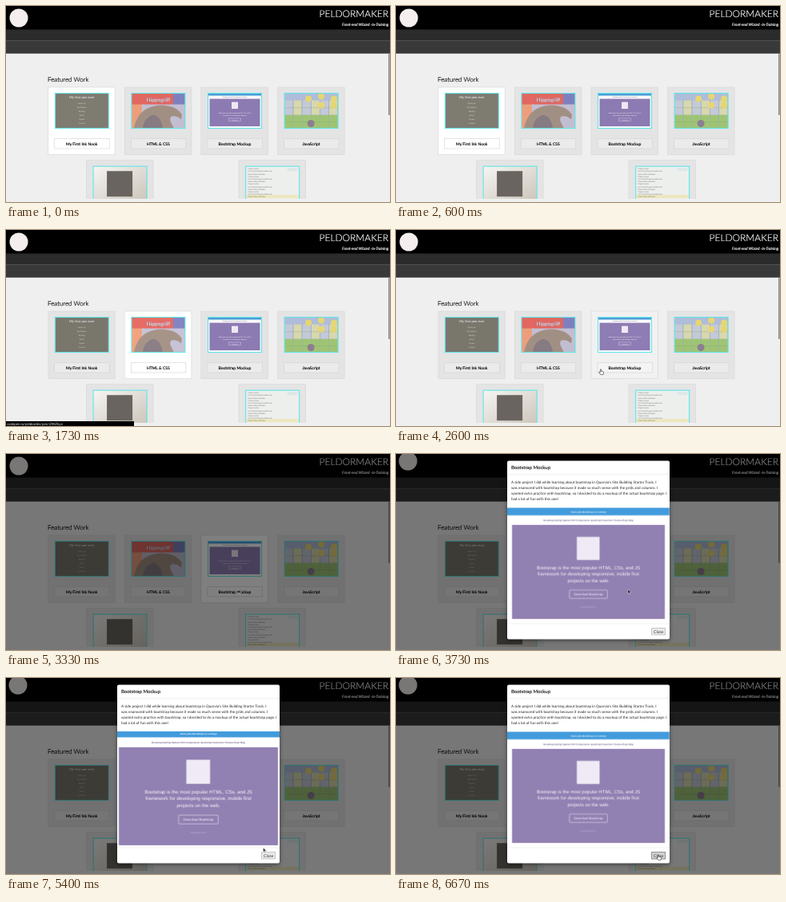
An HTML page that plays this animation: 480 by 246 pixels, repeating every 6740 ms.

```html
<!DOCTYPE html>
<html lang="en">
<head>
<meta charset="utf-8">
<title>Portfolio</title>
<style>
  html, body { margin: 0; width: 100%; height: 100%; overflow: hidden; background: #efefef; }
  svg { display: block; width: 100vw; height: 100vh; font-family: Lato, sans-serif; text-rendering: geometricPrecision; }
  .mid { text-anchor: middle; }
  .end { text-anchor: end; }
  .light { font-weight: 300; }
  .bold { font-weight: 700; }
  .helv { font-family: "Liberation Sans", Arial, sans-serif; }

  .hover, .anim { animation: 6740ms linear infinite; }
  .hover { opacity: 0; fill: #fff; }
  .hover1 { animation-name: hover1; }
  .hover2 { animation-name: hover2; }
  .hover3 { animation-name: hover3; }
  @keyframes hover1 { 0%, 11.87% { opacity: 1 } 13.35%, 100% { opacity: 0 } }
  @keyframes hover2 { 0%, 11.87% { opacity: 0 } 13.35%, 33.8% { opacity: 1 } 36.8%, 100% { opacity: 0 } }
  @keyframes hover3 { 0%, 37.1% { opacity: 0 } 40.1%, 100% { opacity: 1 } }

  #status { animation-name: status; animation-timing-function: step-end; }
  @keyframes status { 0% { opacity: 0 } 12.91% { opacity: 1 } 26.7%, 100% { opacity: 0 } }

  #logo { animation-name: logo; animation-timing-function: step-end; }
  @keyframes logo { 0% { transform: none } 50.45%, 100% { transform: translate(-1px, -6px) } }

  #shade { animation-name: shade; }
  @keyframes shade { 0%, 47.48% { opacity: 0 } 49.26%, 100% { opacity: .5 } }

  #modal { animation-name: slide, appear; animation-timing-function: ease-out, linear; }
  @keyframes slide { 0%, 50.45% { transform: translateY(-61px) } 54.9%, 100% { transform: none } }
  @keyframes appear { 0%, 50.45% { opacity: 0 } 52.67%, 100% { opacity: 1 } }

  #shot { transform-origin: 240.5px 138px; animation-name: zoom; animation-timing-function: ease; }
  @keyframes zoom {
    0%, 59.35% { transform: none }
    63.8%, 80.2% { transform: scale(1.042) }
    84.6%, 100% { transform: none }
  }

  #press { animation-name: press; animation-timing-function: step-end; }
  @keyframes press { 0% { opacity: 0 } 82%, 100% { opacity: 1 } }

  #cursor { animation-name: move; animation-timing-function: ease-in-out; }
  @keyframes move {
    0%, 33.2% { transform: translate(222px, 178px) }
    37.1%, 39.32% { transform: translate(256px, 175px) }
    43.77%, 69.73% { transform: translate(290px, 170px) }
    80.12% { transform: translate(321.5px, 213px) }
    83.83%, 100% { transform: translate(328px, 222px) }
  }
  #hand { animation-name: hand; animation-timing-function: step-end; }
  #arrow { animation-name: arrow; animation-timing-function: step-end; }
  @keyframes hand { 0% { opacity: 0 } 33.6% { opacity: 1 } 47.48% { opacity: 0 } 82%, 100% { opacity: 1 } }
  @keyframes arrow { 0% { opacity: 0 } 47.48% { opacity: 1 } 82%, 100% { opacity: 0 } }
</style>
</head>
<body>
<svg viewBox="0 0 480 246" preserveAspectRatio="none">
  <defs>
    <clipPath id="pageClip"><rect width="480" height="242"/></clipPath>
    <clipPath id="thumbClip"><rect width="67" height="44"/></clipPath>
    <clipPath id="shotClip"><rect x="139" y="67.5" width="203" height="143.5"/></clipPath>
    <linearGradient id="paper" x2="1" y2="1">
      <stop stop-color="#fbfaf7"/><stop offset="1" stop-color="#c6bdb0"/>
    </linearGradient>
    <filter id="blur" x="-20%" y="-20%" width="140%" height="140%"><feGaussianBlur stdDeviation="2.5"/></filter>
  </defs>

  <rect width="480" height="246" fill="#efefef"/>
  <rect width="480" height="30"/>
  <rect y="29.5" width="480" height="13.5" fill="#2b2b2b"/>
  <rect y="43" width="480" height=".7" fill="#1c1c1c"/>
  <rect y="43.7" width="480" height="16" fill="#393939"/>
  <circle id="logo" class="anim" cx="16" cy="15" r="11.5" fill="#f4eeee"/>
  <text class="end light" x="478" y="14" font-size="12" fill="#fff" stroke="#fff" stroke-width=".2">PELDORMAKER</text>
  <text class="end" x="478" y="25.3" font-size="4.75" font-style="italic" fill="#fff" stroke="#fff" stroke-width=".15">Front-end Wizard -in-Training</text>
  <text class="light" x="52" y="95" font-size="8" fill="#111" stroke="#111" stroke-width=".2">Featured Work</text>

  <g id="cards" clip-path="url(#pageClip)"></g>
  <rect x="478" y="60" width="1.7" height="77" rx=".8" fill="#8a8a8a"/>

  <g id="status" class="anim">
    <rect y="240" width="160" height="6"/>
    <text x="1" y="244.7" font-size="4.4" fill="#eee">codepen.io/peldordev/pen/ZWZbyv</text>
  </g>

  <rect id="shade" class="anim" width="480" height="246"/>

  <g id="modal" class="anim">
    <rect x="139" y="10" width="203" height="224" rx="2" opacity=".5" filter="url(#blur)"/>
    <rect x="139" y="8.5" width="203" height="224" rx="2" fill="#fff"/>
    <text x="144" y="19" font-size="6" fill="#111" stroke="#111" stroke-width=".12">Bootstrap Mockup</text>
    <path d="M139 25.5h203M139 213h203" stroke="#e3e3e3" stroke-width=".5"/>
    <g id="story"></g>
    <g clip-path="url(#shotClip)">
      <g id="shot" class="anim helv">
        <rect x="139" y="67.5" width="203" height="143" fill="#fff"/>
        <rect x="139" y="67.5" width="203" height="9.5" fill="#429bdc"/>
        <text class="mid bold" x="240.5" y="73.3" font-size="2.7" fill="#fff">Heck yeah, Bootstrap 4 is coming!</text>
        <text class="mid" x="240.5" y="84" font-size="2.95" fill="#40346a">Bootstrap Getting Started CSS Components JavaScript Customize Themes Expo Blog</text>
        <rect x="145" y="89" width="191" height="118" fill="#9180b2"/>
        <rect x="226" y="104" width="28.5" height="29" fill="#efeaf5"/>
        <g class="mid" fill="#f8f5fc">
          <g font-size="5.85">
            <text x="240.5" y="144.3">Bootstrap is the most popular HTML, CSs, and JS</text>
            <text x="240.5" y="152.7">framework for developing responsive, mobile first</text>
            <text x="240.5" y="161">projects on the web.</text>
          </g>
          <rect x="216.7" y="170.7" width="47.5" height="10.6" rx="1" fill="none" stroke="#e5def0" stroke-width=".6"/>
          <text x="240.5" y="177.5" font-size="4">Download Bootstrap</text>
          <text x="240.5" y="192.7" font-size="2.6" fill="#c9bfdc">Currently v3.3.6</text>
        </g>
      </g>
    </g>
    <rect x="319.7" y="218.7" width="17" height="8.3" fill="#e9e9e9" stroke="#aaa" stroke-width=".6"/>
    <rect id="press" class="anim" x="319.7" y="218.7" width="17" height="8.3" fill="#d2d2d2" stroke="#777" stroke-width=".7"/>
    <text class="mid" x="328.2" y="224.6" font-size="5" fill="#333">Close</text>
  </g>

  <g id="cursor" class="anim" stroke-linejoin="round">
    <path id="hand" class="anim" d="M-.7 0q.7-.7 1.3 0v2.2l2.5.7q.7.3.5 1.3l-.6 2.4h-3.2l-2.1-2.7q0-.9.8-.6l.8.6z" fill="#fff" stroke="#222" stroke-width=".6"/>
    <path id="arrow" class="anim" d="M0 0v5.2l1.2-1.1.9 2 .9-.4-.9-1.9h1.6z" fill="#111" stroke="#fff" stroke-width=".4"/>
  </g>
</svg>
<script>
  const rect = (x, y, w, h, fill) => `<rect x="${x}" y="${y}" width="${w}" height="${h}" fill="${fill}"/>`;
  const disc = (x, y, r, fill) => `<circle cx="${x}" cy="${y}" r="${r}" fill="${fill}"/>`;
  const label = (x, y, size, fill, str, more = 'class="mid"') =>
    `<text x="${x}" y="${y}" font-size="${size}" fill="${fill}" ${more}>${str}</text>`;
  const repeat = (n, make) => Array.from({ length: n }, (_, i) => make(i)).join('');

  const penList = ['About me', 'My hobbies', 'Reading', 'Music', 'Games', 'Contact'];
  const pen = rect(0, 0, 67, 44, '#5e5a4e') +
    label(33.5, 6.5, 4.2, '#fff', 'My first pen ever') +
    penList.map((s, i) => label(33.5, 13 + i * 5, 2.3, '#d8d4c7', s)).join('');

  const painting = rect(0, 0, 67, 44, '#e0483f') +
    rect(0, 14, 15, 30, '#ee8d62') + rect(52, 0, 15, 16, '#6467b4') +
    rect(13, 14, 54, 30, '#b9b4cd') +
    '<path d="M3 44Q7 25 20 19Q33 13 46 16Q58 18 63 27L62 33Q57 28 50 29Q47 31 49 36L53 44z" fill="#927a6b"/>' +
    '<path d="M14 44Q15 31 27 27Q37 29 39 44z" fill="#6f606b"/>' +
    label(33.5, 10, 6.5, '#fff', 'Hippogriff', 'class="mid bold" stroke="#44508c" stroke-width=".2"');

  const mockup = rect(0, 0, 67, 44, '#fff') + rect(0, 0, 67, 3, '#2487d5') +
    label(33.5, 5.6, 1.6, '#40346a', 'Getting Started CSS Components JavaScript') +
    rect(2, 7, 63, 34.5, '#765fa6') + rect(29.5, 11, 8, 8.5, '#efeaf5') +
    label(33.5, 25, 1.9, '#fff', 'Bootstrap is the most popular HTML, CSs, and JS') +
    label(33.5, 28, 1.9, '#fff', 'framework for developing responsive') +
    '<rect x="26" y="31.5" width="15" height="3.5" fill="none" stroke="#e5def0" stroke-width=".4"/>' +
    label(33.5, 34, 1.6, '#fff', 'Download');

  const game = rect(0, 0, 67, 44, '#a2b3d8') + rect(0, 27, 67, 17, '#8fbd58') +
    repeat(6, i => rect(i * 11.2, 9, 10.4, 18, i % 2 ? '#d6d5a0' : '#bcc3d6')) +
    repeat(6, i => rect(i * 11.2 + 10.4, 8, .7, 36, '#86a5b5')) +
    rect(0, 18, 67, .6, '#93a980') + rect(0, 35.5, 67, .6, '#79a652') +
    [[30, 7], [46, 4], [62, 7], [46, 15], [62, 15]].map(([x, y]) => disc(x, y, 4, '#e8d257')).join('') +
    disc(33, 38, 4.5, '#77647f');

  const photo = rect(0, 0, 67, 44, 'url(#paper)') + rect(17, 6, 32, 32, '#4b453f');

  const notes = ['Project notes', 'List of the things to build next', 'Open tasks and ideas'];
  const page = rect(0, 0, 67, 44, '#f0f2f0') + rect(0, 36, 67, 4, '#eee9b4') +
    repeat(13, i => label(3, 4 + i * 3.2, 2.3, '#555', notes[i % 3], '')) +
    rect(52, 2, 13, 4, '#dce8ea');

  function card(x, y, art, name, i) {
    return `<g transform="translate(${x} ${y})">
      <rect width="83.6" height="84.5" fill="#e4e4e4" stroke="#d6d6d6" stroke-width=".6"/>
      <rect class="hover hover${i}" width="83.6" height="84.5" stroke="#ddd" stroke-width=".6"/>
      <g transform="translate(8.6 7.5)" opacity=".8">
        <g clip-path="url(#thumbClip)">${art}</g>
        <rect width="67" height="44" fill="none" stroke="#40e6ea" stroke-width="1.1"/>
      </g>
      <rect x="8" y="64.5" width="68.5" height="12.5" fill="#fff" fill-opacity=".25" stroke="#d2d2d2" stroke-width=".6"/>
      ${label(42, 72.7, 5, '#000', name, 'class="mid" stroke="#000" stroke-width=".15"')}
    </g>`;
  }

  const firstRow = [[pen, 'My First Ink Nook'], [painting, 'HTML &amp; CSS'], [mockup, 'Bootstrap Mockup'], [game, 'JavaScript']];
  document.getElementById('cards').innerHTML =
    firstRow.map(([art, name], i) => card(52.7 + i * 95.6, 102, art, name, i + 1)).join('') +
    card(100.5, 193.7, photo, '', 5) + card(291, 193.7, page, '', 6);

  document.getElementById('story').innerHTML = [
    "A side project I did while learning about bootstrap in Quorvia's Site Building Starter Track. I",
    'was enamored with bootstrap because it made so much sense with the grids and columns. I',
    'wanted extra practice with bootstrap, so I decided to do a mockup of the actual bootstrap page. I',
    'had a lot of fun with this one!'
  ].map((s, i) => label(144, 37 + i * 6.9, 4.6, '#222', s, '')).join('');
</script>
</body>
</html>
```
